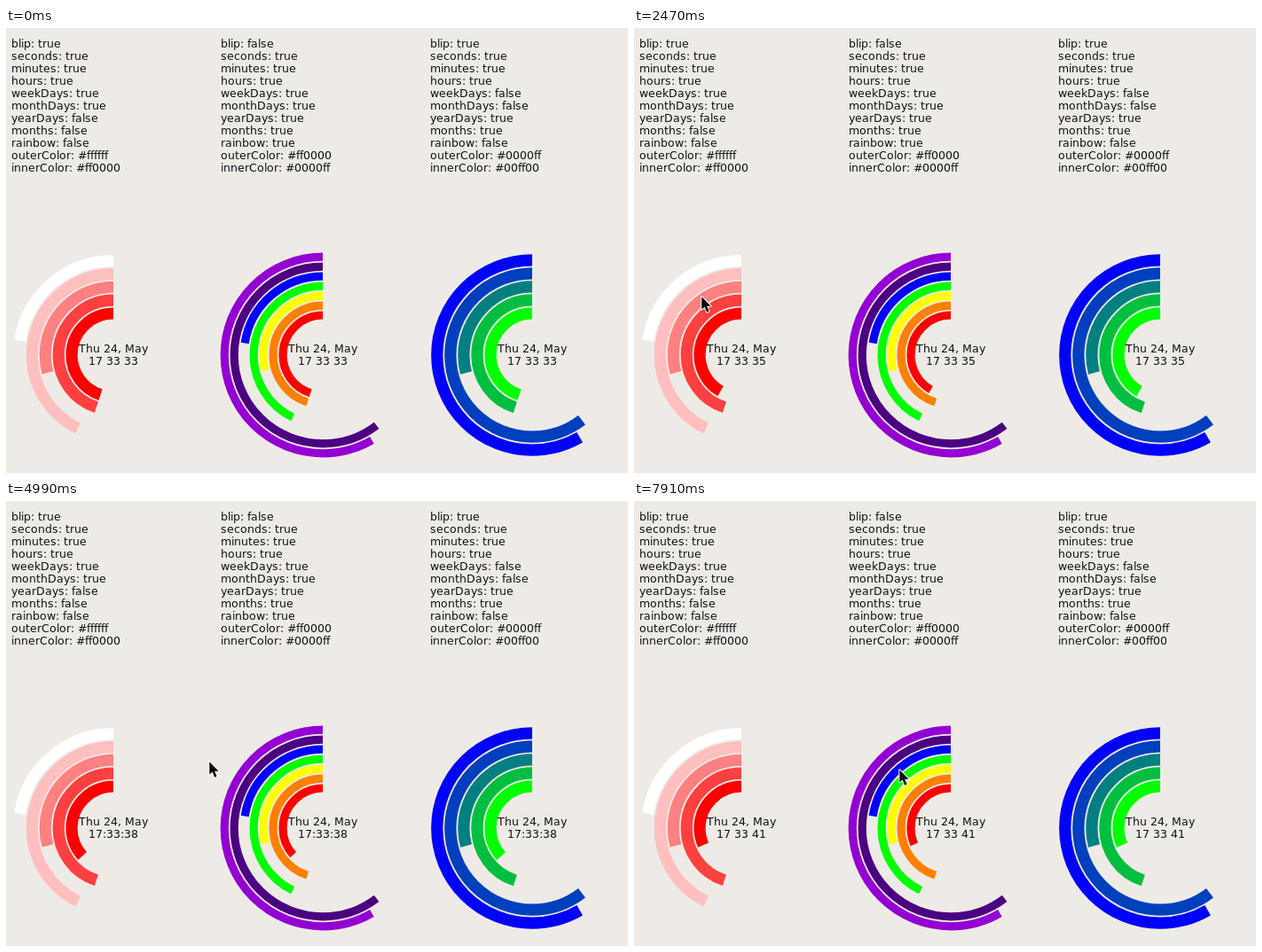
Write an HTML page with a canvas that moves like this. It is 701 px wide and 502 px high and loops after 8000 ms.

```html
<!DOCTYPE html>
<html lang="en">
<head>
<meta charset="utf-8">
<title>Ring clocks</title>
<style>
  html, body { margin: 0; width: 100%; height: 100%; overflow: hidden; background: #eeebe6; }
  canvas { display: block; }
</style>
</head>
<body>
<canvas width="701" height="502"></canvas>
<script>
const ctx = document.querySelector('canvas').getContext('2d', { alpha: false });
const LOOP = 8000, TICK = 947, TAU = Math.PI * 2;

const units = ['seconds', 'minutes', 'hours', 'weekDays', 'monthDays', 'yearDays', 'months'];
const options = ['blip', ...units, 'rainbow'];
// Share of each unit that is still left; seconds are worked out per tick.
const left = { minutes: 27 / 60, hours: 7 / 24, weekDays: 3 / 7, monthDays: 7 / 31, yearDays: 221 / 366, months: 7 / 12 };
const rainbow = ['#ff0000', '#ff7f00', '#ffff00', '#00ff00', '#0000ff', '#4b0082', '#9400d3'];

const clocks = [
  { off: ['yearDays', 'months', 'rainbow'], outer: '#ffffff', inner: '#ff0000', pitch: 14.9 },
  { off: ['blip'], outer: '#ff0000', inner: '#0000ff', pitch: 10.97 },
  { off: ['weekDays', 'monthDays', 'rainbow'], outer: '#0000ff', inner: '#00ff00', pitch: 15.05 }
];

// Where the pointer rests; its tooltip follows a short wait after arrival.
const WAIT = 160;
const stops = [
  { arrive: 110, leave: 110, x: 150, y: 450 },
  { arrive: 700, leave: 1340, x: 64, y: 274, tip: 'Days Left In Month' },
  { arrive: 1720, leave: 2150, x: 70, y: 285, tip: 'Days Left In Week' },
  { arrive: 2610, leave: 2950, x: 75, y: 303, tip: 'Hours Left In Day' },
  { arrive: 3720, leave: 4000, x: 80, y: 320, tip: 'Minutes Left In Hour' },
  { arrive: 4250, leave: 4660, x: 88, y: 332, tip: 'Seconds Left In Minute' },
  { arrive: 5430, leave: 6060, x: 296, y: 273, tip: 'Months Left In Year' },
  { arrive: 6410, leave: 6830, x: 297, y: 287, tip: 'Days Left In Year' },
  { arrive: 7290, leave: LOOP, x: 298, y: 301 }
];

const arrow = new Path2D('M1.3 2.3V16.5L4.6 13.6L7.2 19.7L9.6 18.6L7 12.8H11.6Z');

const lerp = (a, b, k) => Math.round(a + (b - a) * k);

function mix(a, b, k) {
  const part = (hex, i) => parseInt(hex.slice(i, i + 2), 16);
  return `rgb(${[1, 3, 5].map(i => lerp(part(a, i), part(b, i), k))})`;
}

// Letters advance by whole pixels, as in hinted desktop text.
const advance = ch => Math.round(ctx.measureText(ch).width);
const textWidth = s => [...s].reduce((w, ch) => w + advance(ch), 0);

function text(s, x, y) {
  ctx.fillStyle = '#111';
  for (const ch of s) {
    ctx.fillText(ch, x, y);
    x += advance(ch);
  }
}

const centred = (s, cx, y) => text(s, Math.round(cx - textWidth(s) / 2), y);

function drawClock(c, index, second) {
  const on = name => !c.off.includes(name);
  const x = 6 + 236 * index, cx = x + 115, cy = 369;

  const lines = options.map(name => `${name}: ${on(name)}`);
  lines.push(`outerColor: ${c.outer}`, `innerColor: ${c.inner}`);
  lines.forEach((s, i) => text(s, x, 22 + 14 * i));

  const width = c.pitch - 1.8, rings = units.filter(on);
  ctx.lineWidth = width;
  rings.forEach((name, i) => {
    const share = name === 'seconds' ? (60 - second) / 60 : left[name];
    ctx.strokeStyle = on('rainbow') ? rainbow[i] : mix(c.inner, c.outer, i / (rings.length - 1));
    ctx.beginPath();
    ctx.arc(cx, cy, 40.4 + width / 2 + c.pitch * i, -TAU / 4, -TAU / 4 - share * TAU, true);
    ctx.stroke();
  });

  centred('Thu 24, May', cx, 366);
  centred(['17', '33', second].join(second % 2 ? ' ' : ':'), cx, 380);
}

function drawTip({ x, y, tip }) {
  const w = textWidth(tip) + 6;
  ctx.fillStyle = '#000';
  ctx.fillRect(x + 3, y + 18, w, 20);
  ctx.fillStyle = '#ffffdc';
  ctx.fillRect(x + 4, y + 19, w - 2, 18);
  text(tip, x + 6, y + 32);
}

function drawArrow(x, y) {
  ctx.save();
  ctx.translate(x, y);
  ctx.lineWidth = 2;
  ctx.lineJoin = 'round';
  ctx.strokeStyle = '#fff';
  ctx.stroke(arrow);
  ctx.fillStyle = '#000';
  ctx.fill(arrow);
  ctx.restore();
}

function drawPointer(t) {
  const i = stops.findIndex(s => t < s.leave);
  if (i < 1) return;
  const from = stops[i - 1], to = stops[i];
  const u = Math.min(1, (t - from.leave) / (to.arrive - from.leave));
  const k = 1 - (1 - u) ** 2;
  if (to.tip && t >= to.arrive + WAIT) drawTip(to);
  drawArrow(lerp(from.x, to.x, k), lerp(from.y, to.y, k));
}

function draw(t) {
  const second = 33 + Math.floor((t + 48) / TICK);
  ctx.fillStyle = '#eeebe6';
  ctx.fillRect(0, 0, 701, 502);
  ctx.font = '12.5px "DejaVu Sans", sans-serif';
  clocks.forEach((c, i) => drawClock(c, i, second));
  drawPointer(t);
}

const start = performance.now();
function frame() {
  draw((performance.now() - start) % LOOP);
  requestAnimationFrame(frame);
}
frame();
</script>
</body>
</html>
```
